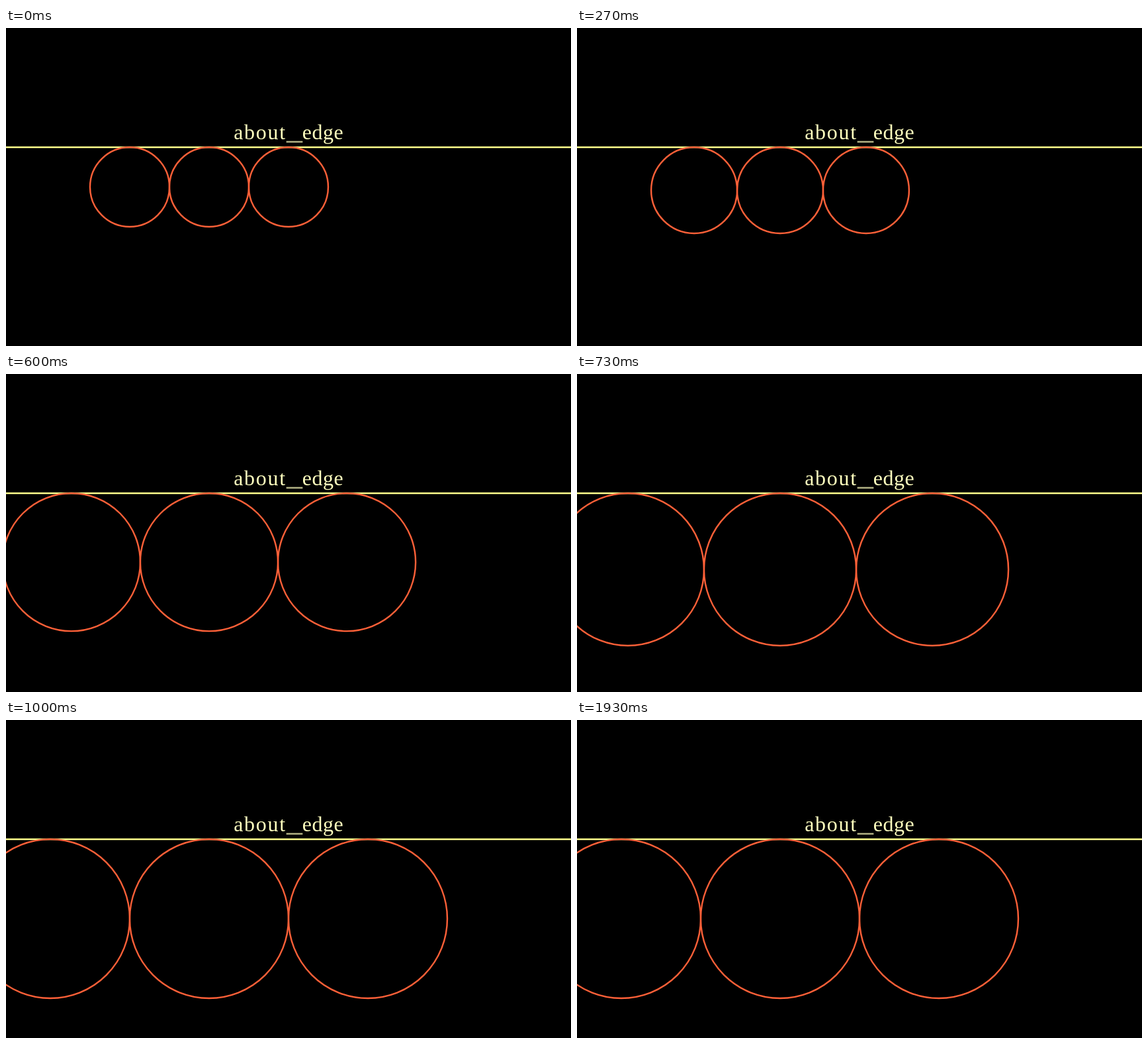
An HTML page that plays this animation: 854x480 px, repeating every 1.99 s.

```html
<!DOCTYPE html>
<html lang="en">
<head>
<meta charset="utf-8">
<title>Scaling about an edge</title>
<style>
  html, body { margin: 0; width: 100%; height: 100%; overflow: hidden; background: #000; }
  svg { display: block; width: 100vw; height: 100vh; }
  text { font: 32px "Liberation Serif", "Times New Roman", serif; fill: #ffffbe; }
  .bar { font-size: 48px; fill-opacity: .7; }
  line { stroke: #ffff8c; stroke-width: 2.4; }
  circle { fill: none; stroke: #fd6038; stroke-width: 2.4; }
</style>
</head>
<body>
<svg viewBox="0 0 854 480">
  <line x1="0" y1="180" x2="854" y2="180"/>
  <text><tspan x="344.2" y="168" letter-spacing="1.7">about</tspan><tspan class="bar" x="424" y="167">_</tspan><tspan x="447.8" y="168" letter-spacing=".5">edge</tspan></text>
  <circle/><circle/><circle/>
</svg>
<script>
const LOOP = 1990;
const FPS = 15;
const EDGE = { x: 307, y: 180 };
const RADIUS = 60;
const circles = document.querySelectorAll('circle');

const sigmoid = x => 1 / (1 + Math.exp(-x));

// Logistic ease, rescaled to run exactly from 0 to 1
function smooth(t) {
  const tail = sigmoid(-5);
  return (sigmoid(10 * (t - 0.5)) - tail) / (1 - 2 * tail);
}

// Steps of 1/15 s, with their starts rounded to 10 ms
const stepAt = ms => Math.floor((Math.floor(ms / 10) + 0.5) * FPS / 100);

function render(ms) {
  const progress = Math.min(1, stepAt(ms % LOOP) / FPS);
  const r = RADIUS * (1 + smooth(progress));
  circles.forEach((circle, i) => {
    circle.setAttribute('cx', EDGE.x + (i - 1) * 2 * r);
    circle.setAttribute('cy', EDGE.y + r);
    circle.setAttribute('r', r);
  });
}

const start = performance.now();
function tick() {
  render(performance.now() - start);
  requestAnimationFrame(tick);
}
tick();
</script>
</body>
</html>
```
